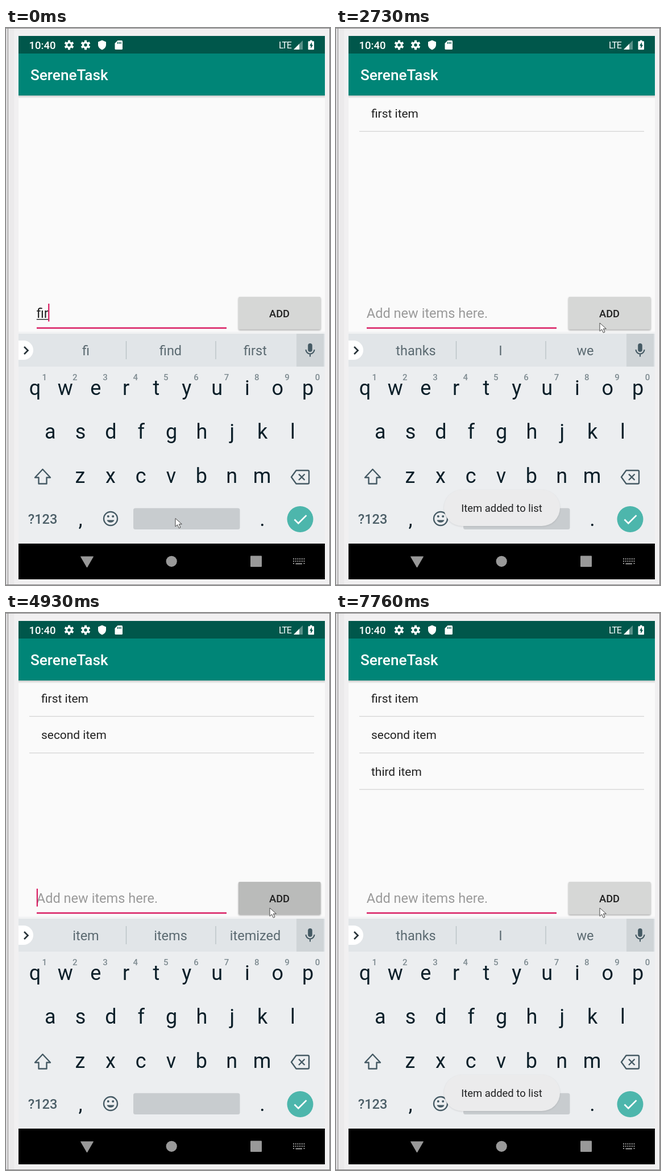
Recreate the animation shown at these times as an HTML page. Size 570 by 982 pixels, loop 8000 ms.

```html
<!DOCTYPE html>
<html lang="en">
<head>
<meta charset="utf-8">
<title>To-do list demo</title>
<style>
  html, body { margin: 0; width: 100%; height: 100%; overflow: hidden; background: #f1f0f1; }
  svg { display: block; width: 100vw; height: 100vh; }
  text { font-family: Roboto, sans-serif; white-space: pre; }
  .mid { text-anchor: middle; }
  .medium { font-weight: 500; }
  .key { font-size: 36px; fill: #0b1f29; }
  .hint { font-size: 15px; font-weight: 500; fill: #7d8a90; }
  .word { font-size: 23.5px; fill: #5b6a71; }
  .item { font-size: 20.95px; fill: #212121; }
  .input { font-size: 23.57px; }
  .icon { fill: none; stroke: #455a64; stroke-width: 2.4; }
</style>
</head>
<body>
<svg id="stage" viewBox="0 0 570 982" xmlns="http://www.w3.org/2000/svg">
  <defs>
    <linearGradient id="barShadow" x2="0" y2="1">
      <stop offset="0" stop-color="#000" stop-opacity=".2"/>
      <stop offset="1" stop-color="#000" stop-opacity="0"/>
    </linearGradient>
    <filter id="soft" x="-10%" y="-20%" width="120%" height="140%"><feGaussianBlur stdDeviation="1.5"/></filter>
    <clipPath id="buttonClip"><rect x="409" y="474" width="144.500" height="57.500" rx="2"/></clipPath>
    <g id="gear">
      <circle r="4.400" fill="none" stroke="#fff" stroke-width="3.400"/>
      <g id="teeth" stroke="#fff" stroke-width="4"></g>
    </g>
  </defs>

  <!-- window frame -->
  <rect width="570" height="982" fill="#f1f0f1"/>
  <rect width="3" height="982" fill="#dedddf"/>
  <rect x="3" width="1.200" height="982" fill="#929192"/>
  <rect x="4.200" width="10" height="982" fill="#ebeaeb"/>
  <rect width="570" height="1" fill="#878687"/>
  <rect x="569" width="1" height="982" fill="#777677"/>
  <rect y="981" width="570" height="1" fill="#878687"/>

  <!-- app -->
  <rect x="22" y="14" width="539" height="525" fill="#fafafa"/>
  <rect x="22" y="119" width="539" height="5" fill="url(#barShadow)"/>
  <rect x="22" y="14" width="539" height="31.500" fill="#00574b"/>
  <rect x="22" y="45" width="539" height="74" fill="#008577"/>
  <text class="medium" x="40.500" y="36.500" font-size="18.500" fill="#fff">10:40</text>
  <use href="#gear" x="111" y="30"/>
  <use href="#gear" x="140" y="30"/>
  <path d="M169 21.500l7 3v5c0 4-3 7.500-7 9-4-1.500-7-5-7-9v-5z" fill="#fff"/>
  <path d="M196.500 22h7q1.500 0 1.500 1.500v13q0 1.500-1.500 1.500h-10.500q-1.500 0-1.500-1.500v-9.500z" fill="#fff"/>
  <path d="M196.500 24.500v3.500M199.300 24.500v3.500M202 24.500v3.500" stroke="#00574b" stroke-width="1.400"/>
  <text x="480" y="35.500" font-size="16" letter-spacing="-1.100" fill="#fff">LTE</text>
  <path d="M522 22v16h-16z" fill="#fff" opacity=".35"/>
  <path d="M516 28v10h-10z" fill="#fff"/>
  <path d="M535 21.500h3.500v1.800h2.500q1 0 1 1v13q0 1-1 1h-8.500q-1 0-1-1v-13q0-1 1-1h2.500z" fill="#fff"/>
  <path d="M538 25l-4 6.200h2.200v5l4-6.400h-2.200z" fill="#00574b"/>
  <text class="medium" x="43" y="92" font-size="26.200" fill="#fff">SereneTask</text>
  <g id="list"></g>

  <!-- entry row -->
  <text id="hintText" class="input" x="53.800" y="511" fill="#9a9a9a">Add new items here.</text>
  <text id="entry" class="input" x="53.800" y="511" fill="#212121"></text>
  <rect id="composing" y="513" height="1.400" fill="#212121"/>
  <rect id="caret" y="486" width="2.200" height="31.500" fill="#d81b60"/>
  <rect x="54" y="527.700" width="334" height="2.500" fill="#d81b60"/>
  <rect x="409" y="475.500" width="144.500" height="57.500" rx="2" fill="#000" opacity=".32" filter="url(#soft)"/>
  <rect x="409" y="474" width="144.500" height="57.500" rx="2" fill="#d6d7d6"/>
  <g clip-path="url(#buttonClip)">
    <rect id="press" x="409" y="474" width="145" height="58"/>
    <circle id="ripple" cy="514" fill-opacity=".045"/>
  </g>
  <text class="mid medium" x="481" y="510" font-size="18.300" fill="#202020">ADD</text>

  <!-- keyboard -->
  <rect x="22" y="535.500" width="539" height="4" fill="#f1f2f3"/>
  <rect x="22" y="539" width="539" height="370" fill="#eceef0"/>
  <rect x="22" y="539" width="539" height="58" fill="#e1e5e8"/>
  <rect x="511" y="539" width="48" height="58" fill="#cfd4d7"/>
  <path d="M22 551h9a17 17 0 0 1 0 34h-9z" fill="#fff"/>
  <path d="M32 562l6.500 6.500-6.500 6.500" class="icon" style="stroke:#263238;stroke-width:2.700"/>
  <path d="M211.500 552v32M369 552v32" stroke="#b8c0c4" stroke-width="1.300"/>
  <rect x="531.200" y="556" width="7.600" height="15" rx="3.800" fill="#455a64"/>
  <path d="M527.500 567a7.500 7.500 0 0 0 15 0M535 574.500v5" class="icon" style="stroke-width:2.100"/>
  <g id="words"></g>
  <g id="keys"></g>
  <path d="M64.500 778l-13.500 14.500h6.500v11h14v-11h6.500z" class="icon" stroke-linejoin="round"/>
  <path d="M510.500 780h20.500q2 0 2 2v19.500q0 2-2 2h-20.500l-8.500-11.700zM515 786.500l10.500 10.500M525.500 786.500l-10.500 10.500" class="icon" stroke-linejoin="round"/>
  <text class="mid medium" x="64.500" y="873.500" font-size="23.600" fill="#4c5f68">?123</text>
  <text class="key mid" x="131" y="878">,</text>
  <text class="key mid" x="451" y="878">.</text>
  <circle cx="184" cy="865" r="12" class="icon"/>
  <g fill="#455a64"><circle cx="179.800" cy="861" r="2"/><circle cx="188.200" cy="861" r="2"/></g>
  <path d="M177.500 867.500h13a6.700 5.500 0 0 1-13 0z" fill="#455a64"/>
  <rect x="224" y="846.500" width="187.500" height="37.500" rx="3.500" fill="#c8cccf"/>
  <circle cx="517.500" cy="866" r="23" fill="#4db6ac"/>
  <path d="M507.500 866.500l6.800 6.800 14.200-14.200" fill="none" stroke="#fff" stroke-width="2.700"/>

  <!-- navigation bar -->
  <rect x="22" y="909" width="539" height="63" fill="#000"/>
  <g fill="#999">
    <path d="M131.500 932h22l-11 19z" stroke="#999" stroke-linejoin="round"/>
    <circle cx="291.200" cy="940.300" r="9.600"/>
    <rect x="430" y="930.500" width="20" height="19.500" rx="1"/>
    <g id="dots"></g>
    <rect x="509.500" y="943.500" width="11.500" height="2"/>
  </g>

  <g id="toast">
    <rect x="190" y="815" width="204" height="64" rx="32" fill="#000" opacity=".1" filter="url(#soft)"/>
    <rect x="190" y="814" width="204" height="64" rx="32" fill="#ebebec"/>
    <text class="mid" x="291.500" y="853" font-size="18.450" fill="#202122">Item added to list</text>
  </g>
  <path id="pointer" d="M0 0v14.500l3.600-3.300 2.700 6 2.700-1.200-2.700-5.800h5z" fill="#fff" stroke="#444" stroke-width="1"/>
</svg>
<script>
const $ = id => document.getElementById(id);
const LOOP = 8000;

function add(parent, tag, attrs, content = '') {
  const el = document.createElementNS('http://www.w3.org/2000/svg', tag);
  for (const name in attrs) el.setAttribute(name, attrs[name]);
  el.textContent = content;
  $(parent).append(el);
  return el;
}
function set(id, attrs) {
  for (const name in attrs) $(id).setAttribute(name, attrs[name]);
}

// Fixed repeats
for (let i = 0; i < 6; i++) {
  add('teeth', 'line', { y1: -5, y2: -8.4, transform: `rotate(${i * 60})` });
}
const keyRow = (letters, x, y) => [...letters].forEach((c, i) =>
  add('keys', 'text', { class: 'key mid', x: x + i * 53.35, y }, c));
keyRow('qwertyuiop', 51, 646.5);
keyRow('asdfghjkl', 77.7, 724);
keyRow('zxcvbnm', 130.5, 801.5);
[...'1234567890'].forEach((c, i) =>
  add('keys', 'text', { class: 'hint mid', x: 67.8 + i * 53.35, y: 621 }, c));
for (let row = 0; row < 3; row++)
  for (let col = 0; col < 6; col++)
    if (row < 2 || col === 0 || col === 5)
      add('dots', 'rect', { x: 505 + col * 3.7, y: 935 + row * 4, width: 2, height: 2 });

const words = [140.5, 289.5, 438.5].map(x =>
  add('words', 'text', { class: 'word mid', x, y: 577 }));
const rows = ['first item', 'second item', 'third item'].map((label, i) => {
  const y = i * 64.4;
  return [
    add('list', 'text', { class: 'item', x: 62, y: 158 + y }, label),
    add('list', 'rect', { x: 41, y: 181.6 + y, width: 501, height: 1.4, fill: '#d8d8d8' })
  ];
});

// Suggestions by the word being typed
const IDLE = 'thanks I we';
const suggestions = {
  fir: 'fi find first', firs: 'first firs firstly', first: 'first firsts firsthand',
  s: 'so see she', se: 'see set send', sec: 'sec second secret',
  secon: 'second seconds secondly', second: 'second seconds secondly',
  t: 'the to that', th: 'the that this', thi: 'this think thing',
  thir: 'third thirty thirds', third: 'third thirds thirdly',
  '': 'time one of', i: 'I is in', it: "it it's its",
  ite: 'item items itemized', item: 'item items itemized'
};
const lastWord = s => s.slice(s.lastIndexOf(' ') + 1);

// Timeline: each entry changes part of the state at its time
const start = {
  text: 'fir', words: suggestions.fir, caret: 1, items: 0, toast: 0,
  press: 0, ripple: 0, rippleX: 475, x: 298, y: 864.5
};
const timeline = [];
const at = (time, change) => timeline.push([time, change]);

function type(from, to, states) {
  states.forEach((text, i) => at(
    from + (to - from) * i / (states.length - 1),
    { text, words: suggestions[lastWord(text)], caret: 1 }));
}
const prefixes = (s, first) =>
  Array.from({ length: s.length - first + 1 }, (_, i) => s.slice(0, first + i));

function movePointer(time, k) {
  at(time, { x: 298 + 177 * k, y: 864.5 - 350.5 * k });
}

type(120, 1060, prefixes('first item', 4));
movePointer(1460, .25);
movePointer(1600, .7);
movePointer(1740, 1);
at(1870, { ripple: 24, press: .01 });
at(2010, { ripple: 47, press: .015 });
at(2160, { ripple: 0, press: .13, items: 1, text: '', x: 464, y: 520 });
at(2290, { press: .05, toast: .5 });
at(2430, { press: 0, toast: 1 });
at(2580, { words: IDLE });
at(2730, { caret: 0 });

const second = prefixes('second item', 1).filter(s => s !== 'seco' && s !== 'second it');
type(3160, 4240, second);
at(4370, { toast: .5 });
at(4510, { toast: 0 });
at(4640, { ripple: 24, press: .01, rippleX: 464 });
at(4780, { ripple: 47, press: .015 });
at(4930, { ripple: 0, press: .13, items: 2, text: '' });
at(5050, { press: .05, toast: .5 });
at(5170, { press: 0, toast: 1, words: IDLE });

type(5320, 6250, prefixes('third it', 1));
type(6370, 6490, prefixes('third item', 9));
at(6950, { toast: .5 });
at(7090, { toast: 0, ripple: 24, press: .01 });
at(7220, { ripple: 47, press: .015 });
at(7360, { ripple: 0, press: .13, items: 3, text: '' });
at(7490, { press: .05, toast: .5 });
at(7620, { press: 0, toast: 1, words: IDLE });
at(7760, { caret: 0 });

const pen = document.createElement('canvas').getContext('2d');
pen.font = '23.57px Roboto, sans-serif';
const widthOf = s => pen.measureText(s).width;

function draw(time) {
  const s = { ...start };
  for (const [when, change] of timeline) if (time >= when - .5) Object.assign(s, change);

  const end = widthOf(s.text);
  const wordStart = widthOf(s.text.slice(0, s.text.length - lastWord(s.text).length));
  $('entry').textContent = s.text;
  set('hintText', { opacity: s.text ? 0 : 1 });
  set('composing', { x: 53.8 + wordStart, width: Math.max(0, end - wordStart) });
  set('caret', { x: 53.8 + end - (s.text ? .7 : 0), opacity: s.caret });

  s.words.split(' ').forEach((word, i) => { words[i].textContent = word; });
  rows.forEach((parts, i) =>
    parts.forEach(part => part.setAttribute('opacity', i < s.items ? 1 : 0)));
  set('press', { 'fill-opacity': s.press });
  set('ripple', { cx: s.rippleX, r: s.ripple });
  set('toast', { opacity: s.toast });
  set('pointer', { transform: `translate(${s.x} ${s.y})` });
}

const begin = performance.now();
function tick() {
  draw((performance.now() - begin) % LOOP);
  requestAnimationFrame(tick);
}
tick();
</script>
</body>
</html>
```
